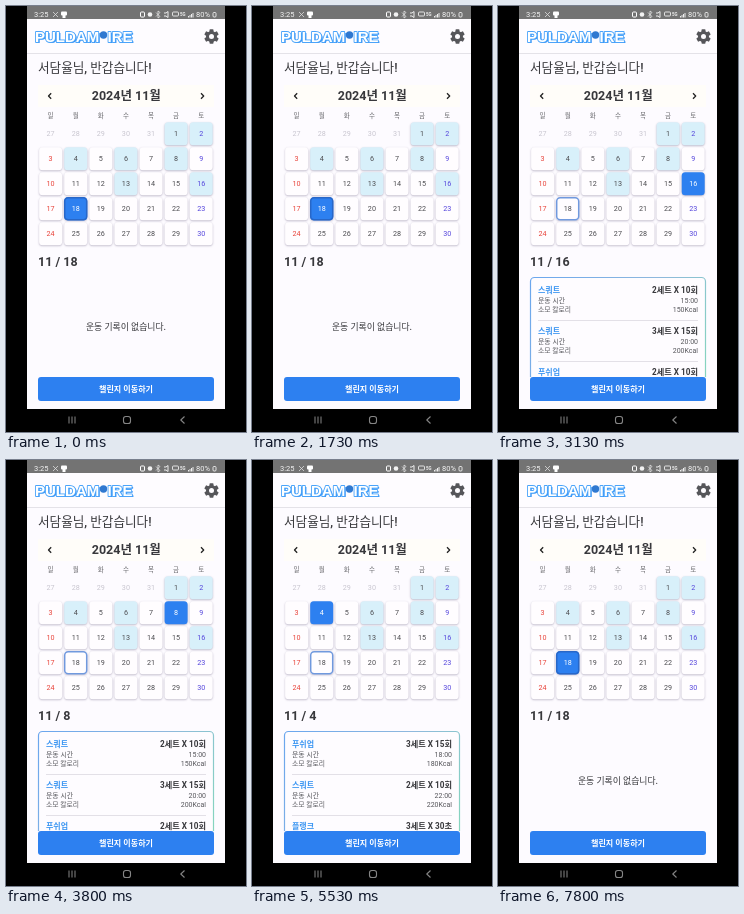
An HTML page with a canvas for the animation above (7.87 s loop, 240x426 px).

```html
<!DOCTYPE html>
<html lang="ko">
<head>
<meta charset="utf-8">
<title>운동 기록 달력</title>
<style>
  html, body { margin: 0; width: 100%; height: 100%; overflow: hidden; background: #000; }
  canvas { display: block; width: 240px; height: 426px; }
</style>
</head>
<body>
<canvas id="stage"></canvas>
<script>
const W = 240, H = 426, LOOP = 7870;
const FONT = 'Roboto, "Noto Sans CJK KR", "Noto Sans CJK", sans-serif';
const BLUE = '#2d80f0', INK = '#38383c', RED = '#e8453c', VIOLET = '#5546dc';

const canvas = document.getElementById('stage');
const ctx = canvas.getContext('2d');
const ratio = window.devicePixelRatio || 1;
canvas.width = W * ratio;
canvas.height = H * ratio;

// When each day of the month is tapped
const taps = [[0, 18], [1850, 16], [3150, 8], [4600, 4], [6050, 2], [7200, 18]];
const active = [1, 2, 4, 6, 8, 13, 16];
const TODAY = 18;

const basic = [
  ['스쿼트', '2세트 X 10회', '15:00', 150],
  ['스쿼트', '3세트 X 15회', '20:00', 200],
  ['푸쉬업', '2세트 X 10회', '15:00', 150]
];
const mixed = [
  ['푸쉬업', '3세트 X 15회', '18:00', 180],
  ['스쿼트', '2세트 X 10회', '22:00', 220],
  ['플랭크', '3세트 X 30초', '15:00', 150]
];
const records = { 16: basic, 8: basic, 4: mixed, 2: basic };

function rect(x, y, w, h, color) {
  ctx.fillStyle = color;
  ctx.fillRect(x, y, w, h);
}

function box(x, y, w, h, r, fill, stroke, line = 1) {
  ctx.beginPath();
  ctx.roundRect(x, y, w, h, r);
  if (fill) { ctx.fillStyle = fill; ctx.fill(); }
  if (stroke) { ctx.strokeStyle = stroke; ctx.lineWidth = line; ctx.stroke(); }
}

function disc(x, y, r, color) {
  ctx.fillStyle = color;
  ctx.beginPath();
  ctx.arc(x, y, r, 0, Math.PI * 2);
  ctx.fill();
}

function path(points, color, width) {
  ctx.beginPath();
  points.forEach(([x, y]) => ctx.lineTo(x, y));
  ctx.strokeStyle = color;
  ctx.lineWidth = width;
  ctx.stroke();
}

// y is the middle of the capital height
function text(str, x, y, size, color, weight = 400, align = 'left') {
  ctx.font = `${weight} ${size}px ${FONT}`;
  ctx.textAlign = align;
  ctx.textBaseline = 'alphabetic';
  ctx.fillStyle = color;
  ctx.fillText(str, x, y + size * 0.355);
}

function statusBar() {
  rect(21, 0, 198, 13, '#737373');
  text('3:25', 28, 8.5, 7.5, '#f4f4f4');
  path([[47, 6], [52, 11]], '#ddd', 0.8);
  path([[52, 6], [47, 11]], '#ddd', 0.8);
  box(55, 5.5, 6, 4, 1, '#fff');
  rect(56.5, 9, 3, 3, '#fff');
  box(134.5, 6, 4, 5, 1, null, '#fff', 1);
  disc(144, 8.5, 2.3, '#f2f2f2');
  path([[150, 6.5], [154, 10.5], [152, 12], [152, 5], [154, 6.5], [150, 10.5]], '#eee', 0.7);
  path([[158, 7], [160, 7], [162, 5.5], [162, 11.5], [160, 10], [158, 10]], '#eee', 1);
  box(166.5, 6, 6, 4, 1, null, '#eee', 0.9);
  text('5G', 174, 8, 4.5, '#eee', 700);
  for (let i = 0; i < 4; i++) rect(182 + i * 1.5, 10 - i, 1, 1.5 + i, '#eee');
  text('80%', 190, 8.5, 7.5, '#f4f4f4');
  box(207, 6.5, 3, 4.5, 1, null, '#eee', 0.9);
}

function logoText(str, x) {
  ctx.font = '700 15px "Liberation Sans", Arial, sans-serif';
  ctx.textAlign = 'left';
  ctx.textBaseline = 'alphabetic';
  ctx.lineJoin = 'round';
  ctx.fillStyle = '#3492f5';
  ctx.fillText(str, x + 1.5, 37);
  ctx.strokeStyle = '#4ba4fa';
  ctx.lineWidth = 1.8;
  ctx.strokeText(str, x, 35.7);
  ctx.fillStyle = '#fff';
  ctx.fillText(str, x, 35.7);
}

function gear(x, y) {
  ctx.save();
  ctx.translate(x, y);
  for (let i = 0; i < 6; i++) {
    box(-2, -7.3, 4, 4, 0.8, '#56565a');
    ctx.rotate(Math.PI / 3);
  }
  ctx.restore();
  disc(x, y, 5.5, '#56565a');
  disc(x, y, 2.5, '#fefcff');
}

function header() {
  rect(21, 13, 198, 34, '#fefcff');
  logoText('PULDAM', 29);
  disc(97.5, 29, 3.7, '#2f78d0');
  logoText('IRE', 101.5);
  gear(205.5, 30.5);
  rect(21, 47, 198, 1, '#e4e2e8');
}

function cell(x, y, day, selected) {
  const on = day === selected;
  const fill = on ? BLUE : active.includes(day) ? '#d8f0fa' : '#fffdff';
  ctx.save();
  ctx.shadowColor = 'rgba(80, 65, 105, 0.38)';
  ctx.shadowBlur = 2 * ratio;
  ctx.shadowOffsetY = 0.7 * ratio;
  box(x - 11.5, y - 11.5, 23, 23, 3.5, fill);
  ctx.restore();
  if (day === TODAY) {
    box(x - 11, y - 11, 22, 22, 3.5, null, on ? '#2867c8' : '#7099de', 1.5);
  }
}

function calendar(selected) {
  rect(32, 79, 176, 22, '#fffdf9');
  path([[45.2, 87.3], [42.5, 90], [45.2, 92.7]], '#222', 1.3);
  path([[195, 87.3], [197.7, 90], [195, 92.7]], '#222', 1.3);
  text('2024년 11월', 120.3, 90, 12.5, INK, 700, 'center');
  for (let i = 0; i < 35; i++) {
    const col = i % 7, row = Math.floor(i / 7);
    const x = 44.6 + col * 25.1, y = 127.7 + row * 25;
    const day = i - 4;
    if (!row) text('일월화수목금토'[col], x, 110, 6.5, '#66666a', 400, 'center');
    let color = '#c9c6d0';
    if (day > 0) {
      cell(x, y, day, selected);
      color = col === 0 ? RED : col === 6 ? VIOLET : '#4c4c50';
      if (day === selected) color = '#fff';
    }
    text(day > 0 ? day : 31 + day, x, y, 7.2, color, 400, 'center');
  }
}

function recordList(items) {
  ctx.save();
  ctx.beginPath();
  ctx.rect(21, 268, 198, 103);
  ctx.clip();
  const edge = ctx.createLinearGradient(32, 271, 208, 371);
  edge.addColorStop(0, '#6aa6ee');
  edge.addColorStop(0.55, '#8fb8dd');
  edge.addColorStop(1, '#85d5bd');
  box(32.5, 271.5, 175, 125, 4, '#fefcff', edge, 1.2);
  items.forEach(([name, sets, time, kcal], i) => {
    const y = 284 + i * 41;
    text(name, 40, y, 8, '#3c96f2', 700);
    text(sets, 200, y, 8.2, INK, 700, 'right');
    text('운동 시간', 40, y + 10.5, 6.9, '#55555a');
    text(time, 200, y + 10.5, 7, '#55555a', 400, 'right');
    text('소모 칼로리', 40, y + 19.8, 6.8, '#55555a');
    text(kcal + 'Kcal', 200, y + 19.8, 7, '#55555a', 400, 'right');
    rect(40, y + 30, 160, 0.8, '#dcdae2');
  });
  ctx.restore();
}

function navBar() {
  rect(0, 403, W, 23, '#000');
  for (let i = 0; i < 3; i++) rect(62.5 + i * 3, 410.5, 1, 7, '#858585');
  box(117.5, 410.5, 7, 7, 2.3, null, '#858585', 1.1);
  path([[178.5, 410.5], [174.8, 414], [178.5, 417.5]], '#858585', 1.1);
}

function draw(t) {
  const selected = taps.filter(([at]) => at <= t).pop()[1];
  ctx.setTransform(ratio, 0, 0, ratio, 0, 0);
  rect(0, 0, W, H, '#000');
  rect(21, 0, 198, 403, '#fdfbff');
  statusBar();
  header();
  text('서담율님, 반갑습니다!', 32, 61.5, 12.6, INK, 500);
  calendar(selected);
  text('11 / ' + selected, 32, 256, 12.5, INK, 700);
  if (records[selected]) recordList(records[selected]);
  else text('운동 기록이 없습니다.', 120, 321, 8.85, INK, 500, 'center');
  box(32, 371, 176, 24, 3, BLUE);
  text('챌린지 이동하기', 120, 383, 8.1, '#fff', 700, 'center');
  navBar();
}

const start = performance.now();
function tick(now) {
  draw(Math.max(0, now - start) % LOOP);
  requestAnimationFrame(tick);
}
draw(0);
requestAnimationFrame(tick);
</script>
</body>
</html>
```
